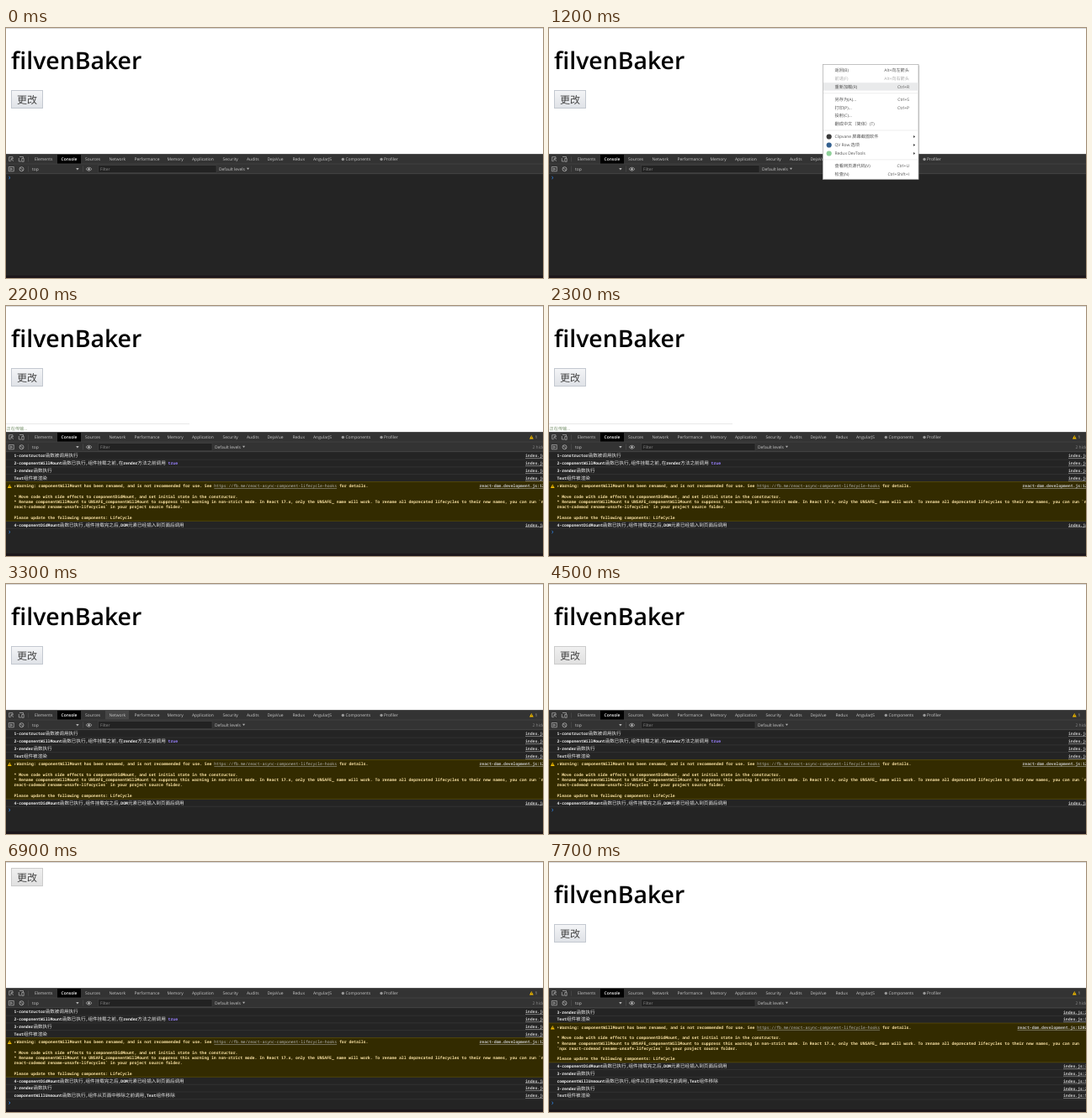
These frames come from a looping animation (638x298 px, 8 s). An HTML page:

```html
<!DOCTYPE html>
<html lang="zh-CN">
<head>
<meta charset="utf-8">
<title>Component lifecycle</title>
<style>
html, body { margin: 0; width: 100%; height: 100%; overflow: hidden; background: #fff; }
svg { display: block; width: 638px; height: 298px; }
text { white-space: pre; text-rendering: geometricPrecision; }
.ui { font-family: "Open Sans", "Noto Sans", "Noto Sans CJK SC", sans-serif; }
.mono { font-family: "Noto Sans Mono", "DejaVu Sans Mono", "Noto Sans CJK SC", monospace; font-weight: 700; }
.cjk { font-family: "Noto Sans CJK SC", "Noto Sans CJK", sans-serif; }
.mono .cjk { font-weight: 500; }
</style>
</head>
<body>
<svg id="stage" viewBox="0 0 638 298" xmlns="http://www.w3.org/2000/svg"></svg>
<script>
const LOOP = 8000;
const ROW = 8.85, LINE = 6.2, TOP = 174.2, WARN_H = 46.7;
const $ = id => document.getElementById(id);

// ---- markup helpers ----
const rect = (x, y, w, h, fill, more = '') =>
  `<rect x="${x}" y="${y}" width="${w}" height="${h}" fill="${fill}" ${more}/>`;
const dot = (x, y, r, fill) => `<circle cx="${x}" cy="${y}" r="${r}" fill="${fill}"/>`;
const path = (d, stroke, fill = 'none', w = 0.7) =>
  `<path d="${d}" stroke="${stroke}" fill="${fill}" stroke-width="${w}"/>`;
const group = (id, body, more = '') => `<g id="${id}" ${more}>${body}</g>`;

// y is the middle of the line; wide characters get their own size
function text(cls, x, y, str, size, wide, fill, more = '') {
  const runs = str.replace(/[\u3000-\u9fff\uff00-\uffef]+/g,
    s => `<tspan class="cjk" font-size="${wide}">${s}</tspan>`);
  return `<text class="${cls}" x="${x}" y="${y + size * 0.36}" font-size="${size}" fill="${fill}" ${more}>${runs}</text>`;
}
const ui = (x, y, str, fill, more) => text('ui', x, y, str, 4.95, 5.2, fill, more);
const mono = (x, y, str, fill, more) => text('mono', x, y, str, 4.775, 5.57, fill, more);
const UNDER = 'text-decoration="underline"';

const triangle = (x, y) =>
  path(`M${x} ${y - 2.2}l2.4 4.4h-4.8z`, 'none', '#f4bd00') + rect(x - 0.3, y - 0.8, 0.6, 1.7, '#332b00');

// ---- web page ----
function page() {
  return rect(0, 0, 638, 150, '#fff') + rect(0, 0, 638, 1, '#d6d6d6') +
    text('ui', 6, 38.9, 'filvenBaker', 28.4, 28.4, '#000', 'id="title" font-weight="600"') +
    group('button',
      rect(6.5, 74.5, 37, 21, 'url(#face)', 'id="face-box" stroke="#c3c8d0"') +
      text('ui', 13, 85.3, '更改', 12, 12, '#444'), 'font-weight="300"') +
    group('status',
      rect(0, 140, 218, 10, '#fff') + path('M0 140.5H218', '#dedede') +
      ui(0.5, 146, '正在传输...', '#76906a'));
}

// ---- developer tools ----
const TABS = [[34, 'Elements'], [65.5, 'Console'], [94, 'Sources'], [122.5, 'Network'], [152.5, 'Performance'],
  [191.5, 'Memory'], [221, 'Application'], [257.5, 'Security'], [286, 'Audits'], [310.5, 'DejaVue'],
  [340.5, 'Redux'], [365, 'AngularJS'], [403.5, 'Components'], [449, 'Profiler']];

function toolbar() {
  const grey = '#b4b4b4';
  const tabs = TABS.map(([x, name]) => name === 'Console'
    ? rect(61, 151, 28, 10.5, '#000') + ui(x, 156.5, name, '#fff', 'font-weight="600"')
    : ui(x, 156.5, name, '#c8c8c8')).join('');
  return rect(0, 150, 638, 24, '#333') + rect(0, 150, 638, 1, '#505050') +
    rect(0, 161.7, 638, 0.6, '#454545') + rect(0, 173.4, 638, 0.7, '#4a4a4a') +
    rect(90, 151, 28, 10.5, '#454545', 'id="hover-sources"') +
    rect(118, 151, 28, 10.5, '#454545', 'id="hover-network"') + tabs +
    dot(400.3, 156.5, 1.7, '#999') + dot(446, 156.5, 1.7, '#999') +
    path('M8 156V153.7H3.7V158.7H5.6M6 155.8L9 158.7M6 155.8V158.3M6 155.8H8.5', grey) +
    path('M16 153.5H20.5V155M15.3 155V159H18M18.8 155.5H21.2V159.3H18.8Z', grey) +
    rect(26.5, 153.5, 0.5, 6, '#555') +
    path('M3.3 165.5H9.3V170.8H3.3ZM5.2 167L7.6 168.2L5.2 169.4Z', grey) +
    `<circle cx="18.5" cy="168.2" r="2.5" fill="none" stroke="${grey}" stroke-width=".8"/>` +
    path('M16.8 166.4L20.3 169.9', grey, 'none', 0.8) +
    rect(26.5, 164.5, 0.5, 7, '#555') + ui(31, 168.2, 'top', '#c8c8c8') +
    path('M83.2 167.1h3.4l-1.7 2.4z', 'none', grey) + rect(91.5, 164.5, 0.5, 7, '#555') +
    path('M95 168.2Q98.5 164.2 102 168.2Q98.5 172.2 95 168.2Z', grey) + dot(98.5, 168.2, 1.2, grey) +
    rect(109.5, 163.7, 140.5, 8.8, '#222', 'id="filter" stroke="#444" stroke-width=".6"') +
    ui(112, 168.2, 'Filter', '#8a8a8a') +
    group('levels', ui(253, 168.2, 'Default levels', '#c8c8c8') + path('M286 166.8h3l-1.5 2.2z', 'none', grey)) +
    group('counts', triangle(624.3, 156.3) + ui(628.5, 156.5, '1', '#c8c8c8') +
      ui(625.5, 168.2, '2 hidden', '#8a8a8a'));
}

const RENDER = ['3-render函数执行', 24];
const CHILD = ['Text组件被渲染', 55];
const LOGS = [
  ['1-constructor函数被调用执行', 12],
  ['2-componentWillMount函数已执行,组件挂载之前,在render方法之前调用 <tspan fill="#9980ff">true</tspan>', 20],
  RENDER, CHILD, 'warning',
  ['4-componentDidMount函数已执行,组件挂载完之后,DOM元素已经插入到页面后调用', 38],
  RENDER,
  ['componentWillUnmount函数已执行,组件从页面中移除之前调用,Text组件移除', 59],
  RENDER, CHILD
];
const rowTop = i => TOP + i * ROW + (i > 4 ? WARN_H - ROW : 0);

const RENAME = '* Rename componentWillMount to UNSAFE_componentWillMount to suppress this warning in non-strict mode. ' +
  'In React 17.x, only the UNSAFE_ name will work. To rename all deprecated lifecycles to their new names, you can run';
const CODEMOD = 'react-codemod rename-unsafe-lifecycles` in your project source folder.';

function warning(top) {
  const c = '#f6dfa2', at = n => top + 5.1 + n * LINE;
  const line = (n, s, more) => mono(9.5, at(n), s, c, more);
  return rect(0, top, 638, WARN_H, '#332b00') + path(`M0 ${top}H638M0 ${top + WARN_H}H638`, '#665500', 'none', 0.6) +
    triangle(4.3, at(0)) + path(`M10 ${at(0) - 1.2}l1.9 1.2l-1.9 1.2z`, 'none', '#b5a774') +
    mono(12.8, at(0), 'Warning: componentWillMount has been renamed, and is not recommended for use. See ' +
      `<tspan fill="#b8b8b8" font-weight="400" ${UNDER}>https://fb.me/react-async-component-lifecycle-hooks</tspan> for details.`, c) +
    line(2, '* Move code with side effects to componentDidMount, and set initial state in the constructor.') +
    line(3, RENAME, 'id="wrap-a"') + line(4, CODEMOD, 'id="wrap-b"') +
    line(6, 'Please update the following components: LifeCycle') +
    group('', mono(562.5, at(0), 'react-dom.development.js:12020', '#c6c6c6', UNDER), 'class="link"');
}

function logRow(item, i) {
  const top = rowTop(i), mid = top + 4.5;
  if (item === 'warning') return group('row' + i, warning(top));
  return group('row' + i, mono(9.5, mid, item[0], '#ececec') +
    group('', mono(617, mid, 'index.js:' + item[1], '#c6c6c6', UNDER), 'class="link"') +
    rect(0, top + ROW - 0.3, 638, 0.6, '#3a3a3a'));
}

function consolePane() {
  return rect(0, 174, 638, 124, '#242424') +
    group('', group('scroll', LOGS.map(logRow).join('') +
      group('prompt', path('M3.4 -1.4L5 0L3.4 1.4', '#2f86e8', 'none', 0.9))), 'clip-path="url(#pane)"') +
    rect(0, 295, 638, 3, '#1d171b');
}

// ---- context menu ----
const MENU = [
  [50, '返回(B)', 'Alt+向左箭头'], [60, '前进(F)', 'Alt+向右箭头'], [70, '重新加载(R)', 'Ctrl+R'],
  [85, '另存为(A)...', 'Ctrl+S'], [95, '打印(P)...', 'Ctrl+P'], [104.7, '投射(C)...'], [114.6, '翻成中文（简体）(T)'],
  [129.5, 'Clipvane 屏幕截图软件', '', '#3a3a3a'], [139.5, 'QV Row 选项', '', '#34608f'],
  [149.5, 'Redux DevTools', '', '#8fd19a'],
  [164.2, '查看网页源代码(V)', 'Ctrl+U'], [174.2, '检查(N)', 'Ctrl+Shift+I']
];

function menu() {
  const items = MENU.map(([y, name, keys, icon], i) => {
    const c = i === 1 ? '#a8a8a8' : '#505050';
    return ui(339.5, y, name, c) + (keys ? ui(428, y, keys, c, 'text-anchor="end"') : '') +
      (icon ? dot(332.7, y, 3.1, icon) + path(`M433 ${y - 1.6}l2 1.6l-2 1.6z`, 'none', '#333') : '');
  }).join('');
  return group('menu', rect(326.5, 44.5, 113.5, 136.5, '#000', 'opacity=".22"') +
    rect(325.5, 43.5, 113.5, 136.8, '#fff', 'stroke="#b4b4b4" stroke-width=".8"') +
    rect(326, 0, 112.6, 9.4, '#e9eaeb', 'id="pick"') +
    path('M326 77.7H438.6M326 122H438.6M326 156.9H438.6', '#e6e6e6') + items);
}

const stop = (at, c) => `<stop offset="${at}" stop-color="${c}"/>`;
const face = (id, a, b) => `<linearGradient id="${id}" x2="0" y2="1">${stop(0, a)}${stop(1, b)}</linearGradient>`;
$('stage').innerHTML = `<defs>${face('face', '#f4f5f7', '#dfe2e7')}${face('pressed', '#f0f0f0', '#e0e0e0')}
  <clipPath id="pane">${rect(0, 174, 638, 121, '#000')}</clipPath></defs>` +
  page() + consolePane() + toolbar() + menu();

// ---- timeline: each step changes part of the state ----
const START = { title: 1, status: 0, logs: 0, menu: 0, pick: -1, tab: '', grey: 0, narrow: 0 };
const STEPS = [
  [800, { menu: 1 }],
  [1000, { pick: 0 }], [1100, { pick: 1 }], [1200, { pick: 2 }],
  [1500, { menu: 0, pick: -1 }],
  [1800, { status: 1 }],
  [1900, { title: 0 }],
  [2100, { logs: 4 }],
  [2200, { title: 1, logs: 6 }],
  [2400, { status: 0.65 }], [2500, { status: 0.3 }], [2600, { status: 0 }],
  [3000, { tab: 'sources' }], [3300, { tab: 'network' }], [3400, { tab: '' }],
  [4500, { grey: 1 }],
  [4600, { title: 0, logs: 8 }],
  [7700, { title: 1, logs: 10, grey: 0, narrow: 1 }]
];

const show = (id, on) => $(id).setAttribute('visibility', on ? 'visible' : 'hidden');
const move = (el, x, y) => el.setAttribute('transform', `translate(${x} ${y})`);

function draw(s) {
  show('title', s.title);
  move($('button'), 0, s.title || !s.logs ? 0 : -67);
  show('button', s.title || s.logs > 6);
  $('face-box').setAttribute('fill', s.grey ? 'url(#pressed)' : 'url(#face)');
  $('face-box').setAttribute('stroke', s.grey ? '#cccccc' : '#c3c8d0');
  $('status').setAttribute('opacity', s.status);

  LOGS.forEach((_, i) => show('row' + i, i < s.logs));
  move($('prompt'), 0, rowTop(s.logs) + 4.3);
  move($('scroll'), 0, s.narrow ? -17.5 : 0);
  document.querySelectorAll('.link').forEach(el => move(el, s.narrow ? -6 : 0, 0));
  $('wrap-a').textContent = RENAME + (s.narrow ? '' : ' `npx');
  $('wrap-b').textContent = (s.narrow ? '`npx ' : '') + CODEMOD;

  show('counts', s.logs);
  $('filter').setAttribute('width', s.logs ? 135.5 : 140.5);
  move($('levels'), s.logs ? -5 : 0, 0);
  show('hover-sources', s.tab === 'sources');
  show('hover-network', s.tab === 'network');

  show('menu', s.menu);
  show('pick', s.pick >= 0);
  if (s.pick >= 0) $('pick').setAttribute('y', MENU[s.pick][0] - 4.8);
}

let last = -1;
function tick(now) {
  const t = now % LOOP;
  const n = STEPS.filter(step => step[0] <= t).length;
  if (n !== last) {
    last = n;
    draw(Object.assign({}, START, ...STEPS.slice(0, n).map(step => step[1])));
  }
  requestAnimationFrame(tick);
}
tick(performance.now());
</script>
</body>
</html>
```
